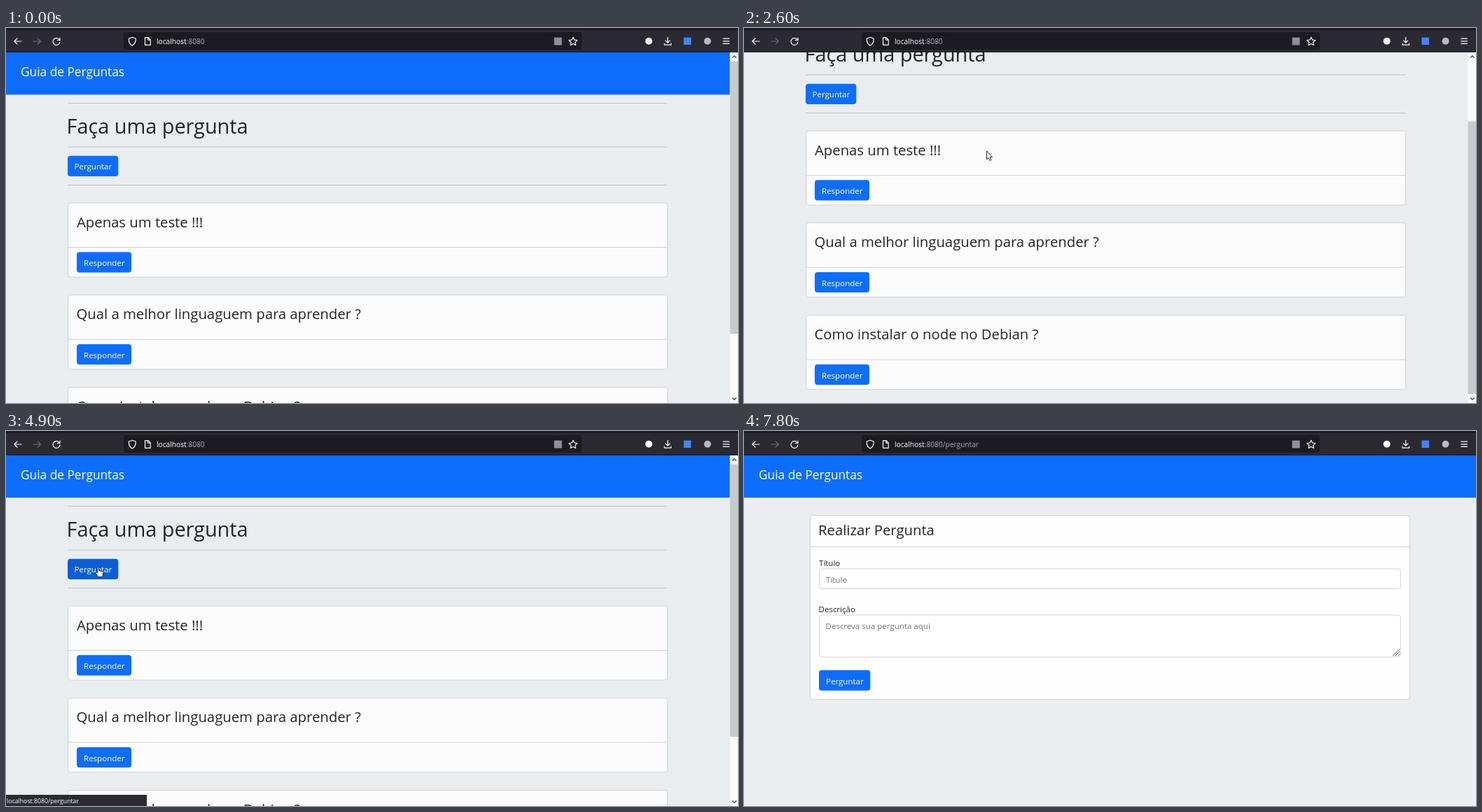
An HTML page for the animation above (8 s loop, 1045 by 536 pixels).

```html
<!DOCTYPE html>
<html lang="pt-BR">
<head>
<meta charset="utf-8">
<title>Guia de Perguntas</title>
<style>
html, body { margin: 0; width: 100%; height: 100%; overflow: hidden; background: #eaedf0; }
svg { display: block; width: 1045px; height: 536px; font-family: "Open Sans", "Noto Sans", sans-serif; }
.page { font-size: 11.54px; fill: #212529; }
.brand { font-size: 17.3px; fill: #fff; }
.h1 { font-size: 28.85px; }
.h3 { font-size: 20.3px; }
.btn { fill: #0d6efd; }
.btn-text { fill: #fff; }
.blue { fill: #0d6efd; }
.rule { fill: #bcbfc3; }
.card { fill: #fcfcfd; stroke: #d2d4d7; }
.split { stroke: #cfd1d4; }
.field { fill: #fff; stroke: #ced4da; }
.hint { fill: #6c757d; }
.icon { fill: none; stroke: #fbfbfe; stroke-width: 1.2; stroke-linecap: round; stroke-linejoin: round; }
.url { font-size: 10.2px; fill: #fbfbfe; }
.dim { fill: #a9a9b0; }
.status { font-size: 8.75px; fill: #fbfbfe; }

/* 100 ms = 1.25% of the loop */
.anim { animation: 8s step-end infinite; }
.scroll { animation-name: scroll; }
.thumb { animation-name: thumb; }
.arrow { animation-name: arrow; }
.hand { visibility: hidden; animation-name: hand; }
.beam { animation-name: beam; }
.pointer { animation-name: pointer; }
.ask { animation-name: ask; }
.home { animation-name: home; }
.form { visibility: hidden; animation-name: form; }
.path { visibility: hidden; animation-name: path; }
.reload { animation-name: reload; }
.stop { visibility: hidden; animation-name: stop; }
.bar { visibility: hidden; animation-name: bar; }
.link { animation-name: link; }
.read { visibility: hidden; animation-name: read; }

@keyframes scroll {
  0%, 40% { transform: translateY(0); }
  18.75% { transform: translateY(-7px); }
  20% { transform: translateY(-52px); }
  21.25% { transform: translateY(-97px); }
  22.5% { transform: translateY(-103px); }
  35% { transform: translateY(-90px); }
  37.5% { transform: translateY(-35.5px); }
  38.75% { transform: translateY(-7px); }
}
@keyframes thumb {
  0%, 40% { transform: translateY(0); }
  18.75% { transform: translateY(6px); }
  20% { transform: translateY(44px); }
  21.25% { transform: translateY(81px); }
  22.5% { transform: translateY(86px); }
  35% { transform: translateY(75.5px); }
  37.5% { transform: translateY(30px); }
  38.75% { transform: translateY(6px); }
}
@keyframes pointer {
  0% { transform: translate(346px, 170px); }
  31.25% { transform: translate(346px, 173px); }
  32.5% { transform: translate(346px, 175px); }
  43.75% { transform: translate(325px, 214px); }
  45% { transform: translate(250px, 250px); }
  46.25% { transform: translate(186px, 214px); }
  47.5% { transform: translate(143px, 177px); }
  48.75% { transform: translate(122px, 160px); }
  50% { transform: translate(112px, 168px); }
  51.25% { transform: translate(108px, 184px); }
  52.5% { transform: translate(112px, 190px); }
  56.25% { transform: translate(205px, 110px); }
  57.5% { transform: translate(284px, 62px); }
  58.75% { transform: translate(240px, 102px); }
  60% { transform: translate(175px, 160px); }
  61.25% { transform: translate(132px, 194px); }
  63.75% { transform: translate(134px, 195px); }
  67.5% { transform: translate(190px, 198px); }
  68.75% { transform: translate(260px, 202px); }
  70% { transform: translate(325px, 204px); }
  71.25% { transform: translate(370px, 205px); }
  72.5% { transform: translate(388px, 205px); }
  77.5% { transform: translate(382px, 203px); }
  78.75% { transform: translate(362px, 198px); }
  80% { transform: translate(341px, 193px); }
  81.25% { transform: translate(331px, 191px); }
  92.5% { transform: translate(308px, 192px); }
  93.75% { transform: translate(268px, 193px); }
  95% { transform: translate(248px, 194px); }
}
@keyframes arrow {
  0%, 51.25%, 61.25%, 97.5% { visibility: hidden; }
  1.25%, 56.25%, 67.5% { visibility: visible; }
}
@keyframes hand {
  51.25%, 61.25% { visibility: visible; }
  56.25%, 67.5% { visibility: hidden; }
}
@keyframes beam { 1.25% { visibility: hidden; } }
@keyframes ask {
  0%, 56.25% { fill: #0d6efd; stroke: none; }
  51.25%, 61.25% { fill: #0b5ed7; stroke: none; }
  67.5% { fill: #0d6efd; stroke: #0a58ca; }
}
@keyframes home { 77.5% { visibility: hidden; } }
@keyframes form { 77.5% { visibility: visible; } }
@keyframes path { 66.25% { visibility: visible; } }
@keyframes reload {
  65% { visibility: hidden; }
  85% { visibility: visible; }
}
@keyframes stop {
  65% { visibility: visible; }
  85% { visibility: hidden; }
}
@keyframes bar {
  55%, 61.25% { visibility: visible; }
  56.25%, 80% { visibility: hidden; }
}
@keyframes link {
  0% { fill-opacity: 1; }
  75% { fill-opacity: 0; }
}
@keyframes read {
  75% { visibility: visible; }
  80% { visibility: hidden; }
}
</style>
</head>
<body>
<svg viewBox="0 0 1045 536">
  <defs>
    <g id="card">
      <rect class="card" x="88.5" y="250" width="856" height="106" rx="4"/>
      <path class="split" d="M89 313.5H944"/>
      <rect class="btn" x="101" y="320.3" width="78" height="29.2" rx="4"/>
      <text class="btn-text" x="111" y="340">Responder</text>
    </g>
  </defs>

  <rect width="1045" height="536" fill="#eaedf0"/>

  <g class="page home anim">
    <g class="scroll anim">
      <rect class="blue" y="34" width="1034" height="61.3"/>
      <text class="brand" x="21" y="69">Guia de Perguntas</text>
      <rect class="rule" x="88" y="107" width="856" height="1"/>
      <text class="h1" x="86.5" y="151">Faça uma pergunta</text>
      <rect class="rule" x="88" y="169.5" width="856" height="1"/>
      <rect class="btn ask anim" x="88" y="182.7" width="72.3" height="29.3" rx="4"/>
      <text class="btn-text" x="97.5" y="202">Perguntar</text>
      <rect class="rule" x="88" y="224" width="856" height="1"/>
      <use href="#card"/>
      <text class="h3" x="101" y="285">Apenas um teste !!!</text>
      <use href="#card" y="131.6"/>
      <text class="h3" x="100.5" y="416">Qual a melhor linguaguem para aprender ?</text>
      <use href="#card" y="263.5"/>
      <text class="h3" x="100.5" y="547.5">Como instalar o node no Debian ?</text>
    </g>
    <rect x="1033.5" y="34" width="12" height="502" fill="#fafafb"/>
    <rect class="thumb anim" x="1033.5" y="47.5" width="11.5" height="389.5" fill="#c9cacc"/>
    <path d="M1037 42.5l2.8-2.8 2.8 2.8M1037 528.5l2.8 2.8 2.8-2.8" fill="none" stroke="#505050" stroke-width="1.4"/>
  </g>

  <g class="page form anim">
    <rect width="1045" height="536" fill="#ecedf1"/>
    <rect class="blue" y="34" width="1045" height="61.3"/>
    <text class="brand" x="21" y="69">Guia de Perguntas</text>
    <rect class="card" x="94.5" y="120.5" width="856" height="263" rx="4" style="fill:#fefefe"/>
    <path class="split" d="M95 165.5H950"/>
    <text class="h3" x="106" y="149">Realizar Pergunta</text>
    <text x="107" y="192.5">Título</text>
    <rect class="field" x="107.5" y="197" width="830" height="28.5" rx="4"/>
    <text class="hint" x="117" y="216.5">Título</text>
    <text x="106.5" y="259">Descrição</text>
    <rect class="field" x="107.5" y="263" width="830" height="60" rx="4"/>
    <text class="hint" x="116.5" y="283">Descreva sua pergunta aqui</text>
    <path d="M926 321.5l10-10M929.5 321.5l6.5-6.5M933 321.5l3-3" stroke="#555" fill="none"/>
    <rect class="btn" x="107" y="341.7" width="73.3" height="29.3" rx="4"/>
    <text class="btn-text" x="117" y="361.5">Perguntar</text>
  </g>

  <g class="status bar anim">
    <rect x="0" y="520" width="201" height="16" fill="#2b2a33"/>
    <text class="link anim" x="1" y="532">localhost:8080/perguntar</text>
    <text class="read anim" x="1" y="532">Leu cdn.jsdelivr.net</text>
  </g>

  <g>
    <rect width="1045" height="34.5" fill="#2b2a33"/>
    <rect width="1045" height="3" fill="#1c1b22"/>
    <rect y="33.6" width="1045" height="1" fill="#111016"/>
    <rect x="168" y="6" width="654" height="25" rx="3" fill="#1c1b22"/>
    <g class="icon">
      <path d="M22 19H12M16 15l-4.2 4 4.2 4"/>
      <path d="M39 19H49M45.200 15l4.200 4-4.200 4" stroke="#6a6972"/>
      <g class="reload anim"><path d="M76.200 16.600A5 5 0 1 0 77 20M77 14v3.400h-3.500"/></g>
      <path class="stop anim" d="M68 15l8.600 8.600M76.600 15L68 23.600"/>
      <path d="M180.200 13.200l5 1.800c.2 4.500-1 8-5 10-4-2-5.200-5.500-5-10z"/>
      <path d="M198.500 13.700h4.500l3.200 3.200v7.400h-7.700zM202.800 13.900v3.200h3.300"/>
      <path d="M809.700 13.200l1.800 3.700 4.100.6-3 2.900.7 4.100-3.600-2-3.700 2 .7-4.100-3-2.900 4.100-.6z"/>
      <path d="M944.700 13.300v7.500M941.500 17.800l3.200 3.200 3.200-3.200M940 22v2.200h9.500V22"/>
      <path d="M1023.800 15.200h8.600M1023.800 18.800h8.600M1023.800 22.400h8.600"/>
    </g>
    <rect x="782.500" y="13.500" width="11" height="11" fill="#8f8f97"/>
    <circle cx="917.700" cy="18.700" r="5" fill="#fbfbfe"/>
    <rect x="967.500" y="13.500" width="10.500" height="10.500" fill="#4285f4"/>
    <circle cx="1001.500" cy="18.700" r="5" fill="#b9b9be"/>
    <text class="url" x="215" y="22.700">localhost<tspan class="dim">:8080<tspan class="path anim">/perguntar</tspan></tspan></text>
  </g>

  <path class="beam anim" d="M298.500 144.500h4.500M300.700 144.500v11M298.500 155.500h4.500" fill="none" stroke="#fff"/>
  <g class="pointer anim" stroke="#111" stroke-width=".9" stroke-linejoin="round" fill="#fff">
    <path class="arrow anim" d="M.5.7v12.100l2.700-2.500 1.900 4.200 1.900-.8-1.900-4.100h3.500z"/>
    <path class="hand anim" d="M-1.500 8V1.200Q-.5-.3.500 1.200V5.500l5 1q1.500.5 1.300 2L6 14.500H-.5L-4 9.500q-.5-2 1-1.500z"/>
  </g>
</svg>
</body>
</html>
```
